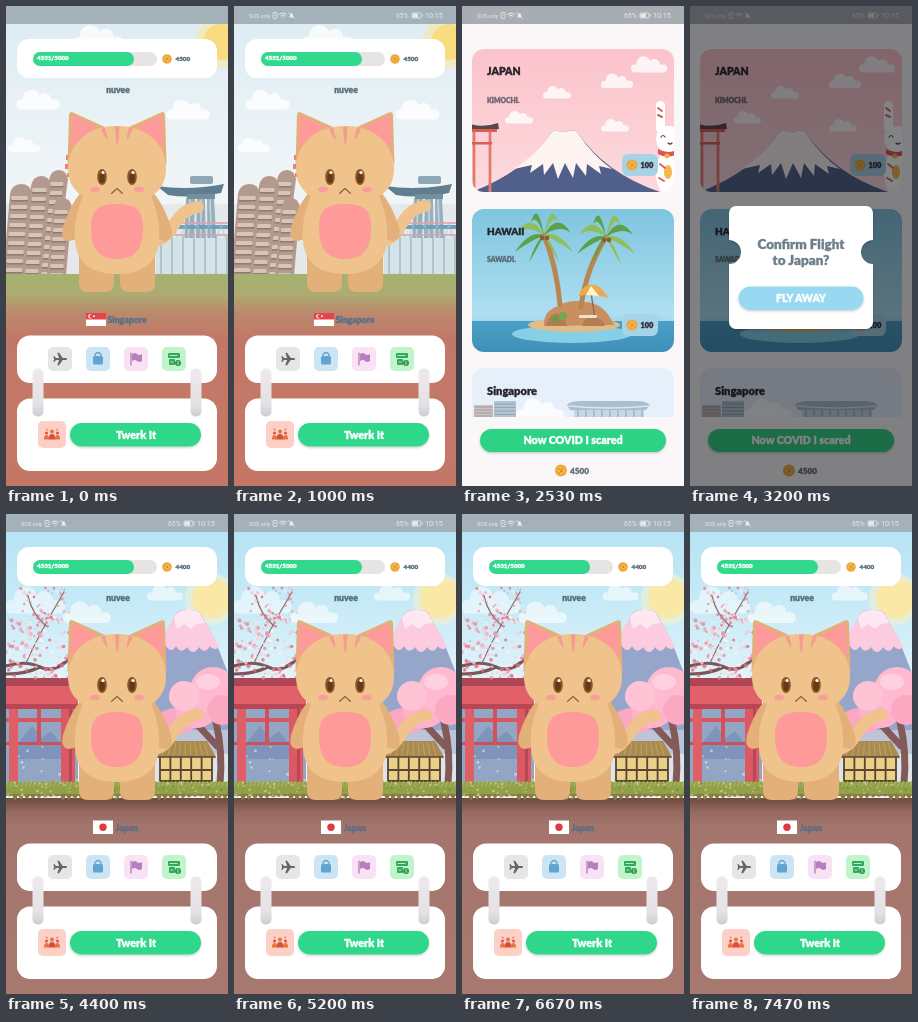
An HTML page that plays this animation: 222 by 480 pixels, repeating every 7.54 s.

```html
<!DOCTYPE html>
<html lang="en">
<head>
<meta charset="utf-8">
<title>Cat travel app</title>
<style>
html, body { margin: 0; width: 100%; height: 100%; overflow: hidden; background: #fff; }
svg { display: block; width: 222px; height: 480px; }
text { font-family: Lato, "Open Sans", sans-serif; font-weight: 900; stroke-width: .35; stroke-linejoin: round; }
.thin { font-family: Roboto, Inter, sans-serif; font-weight: 400; stroke: none; }
</style>
</head>
<body>
<svg id="stage" viewBox="0 0 222 480"></svg>
<script>
const LOOP = 7540;

// Seeded random numbers for the blossoms
let seed = 11;
const rnd = () => (seed = (seed * 16807) % 2147483647) / 2147483647;

// Shape helpers
const rect = (x, y, w, h, fill, r = 0, more = '') =>
  `<rect x="${x}" y="${y}" width="${w}" height="${h}" rx="${r}" fill="${fill}" ${more}/>`;
const oval = (x, y, rx, ry, fill, more = '') =>
  `<ellipse cx="${x}" cy="${y}" rx="${rx}" ry="${ry}" fill="${fill}" ${more}/>`;
const dot = (x, y, r, fill, more) => oval(x, y, r, r, fill, more);
const path = (d, fill, more = '') => `<path d="${d}" fill="${fill}" ${more}/>`;
const line = (d, color, w, more = '') =>
  path(d, 'none', `stroke="${color}" stroke-width="${w}" stroke-linecap="round" stroke-linejoin="round" ${more}`);
const text = (x, y, size, fill, s, anchor = 'start', more = '') =>
  `<text x="${x}" y="${y}" font-size="${size}" fill="${fill}" stroke="${fill}" text-anchor="${anchor}" ${more}>${s}</text>`;
const group = (id, body, more = '') => `<g id="${id}" ${more}>${body}</g>`;
const at = (x, y, body, s = 1) => `<g transform="translate(${x} ${y}) scale(${s})">${body}</g>`;
const range = n => [...Array(n).keys()];
const gradient = (id, ...stops) => `<linearGradient id="${id}" x2="0" y2="1">` +
  stops.map(([o, c]) => `<stop offset="${o}" stop-color="${c}"/>`).join('') + '</linearGradient>';

const cloud = (x, y, s, fill = '#fff', alpha = .8) => at(x, y,
  `<g fill="${fill}" opacity="${alpha}"><rect x="-20" y="-4" width="40" height="9" rx="4.5"/>` +
  '<circle cx="-6" cy="-5" r="8"/><circle cx="6" cy="-4" r="6"/></g>', s);
const coin = (x, y, r) => dot(x, y, r, '#eea83a') + dot(x, y, r * .62, '#f3b850') +
  line(`M${x - r * .4} ${y - r * .3}l${r * .8} ${r * .6}M${x + r * .3} ${y - r * .4}l${-r * .6} ${r * .9}`, '#d98c28', r * .17);

const defs = '<defs>' +
  gradient('sgSky', [0, '#dcebf3'], [.5, '#eef4f7'], [1, '#f7f6f4']) +
  gradient('sgFloor', [0, '#a3b26f'], [.1, '#adab72'], [.18, '#bb8a6c'], [.3, '#c27868'], [1, '#c47767']) +
  gradient('jpSky', [0, '#b4e2f4'], [.3, '#c6eaf7'], [.6, '#e6f5fa'], [1, '#eef5f6']) +
  gradient('jpFloor', [0, '#6f4a40'], [.07, '#966a60'], [.14, '#a3756c'], [1, '#a8796f']) +
  gradient('sea', [0, '#7fc5df'], [.74, '#aedff0'], [.78, '#a4d8ea'], [.78, '#4c9fc6'], [1, '#3f90b8']) +
  gradient('pink', [0, '#fbc3cb'], [1, '#fcdadd']) +
  gradient('strap', [0, '#eceaec'], [.75, '#e4e1e5'], [1, '#cfcbd1']) +
  '<clipPath id="c1"><rect x="10" y="43" width="202" height="143" rx="12"/></clipPath>' +
  '<clipPath id="c2"><rect x="10" y="203" width="202" height="143" rx="12"/></clipPath>' +
  '<clipPath id="c3"><path d="M10 411V374a12 12 0 0 1 12-12H200a12 12 0 0 1 12 12V411z"/></clipPath>' +
  '<filter id="soft" x="-20%" y="-20%" width="140%" height="150%"><feDropShadow dx="0" dy="1.2" stdDeviation="1.2" flood-opacity=".2"/></filter>' +
  '</defs>';

// Singapore backdrop
function singapore() {
  let s = rect(0, 0, 222, 310, 'url(#sgSky)');
  s += dot(215, 36, 26, '#fbe9a5', 'opacity=".6"') + dot(215, 36, 18, '#f9dc80');
  s += group('sgClouds', cloud(32, 98, 1.1) + cloud(182, 108, 1.1) + cloud(92, 36, 1.3) + cloud(18, 142, .8));
  s += rect(0, 198, 222, 74, '#e6e9ec');
  // Curved blocks with window rows
  const block = (x, y, w, lean) => {
    let b = path(`M${x} 270L${x + lean} ${y + 10}q2-10 ${w / 2}-10t${w / 2} 9L${x + w} 270z`, '#b4998e');
    for (let i = 0; i < (260 - y) / 9; i++) {
      const k = lean * (1 - (i * 9 + 12) / (270 - y));
      b += rect(x + k + 2, y + 12 + i * 9, w - 5, 4, '#d8c5ba', 2) +
        rect(x + k + 2, y + 16 + i * 9, w - 5, 1.5, '#927a73');
    }
    return b;
  };
  s += block(30, 164, 19, 13) + block(15, 170, 20, 10) + block(-3, 178, 22, 7) + block(41, 192, 19, 6);
  s += rect(60, 149, 7, 5, '#e98079') + rect(59, 158, 8, 5, '#e98079') + rect(61, 167, 6, 4, '#e98079');
  // Three towers under one deck
  s += path('M180 192h9l-2 78h-10zM191 192h8l1 78h-11zM201 192h7l4 78h-10z', '#96afbd');
  s += line('M184 194l-3 75M195 194v75M204 194l3 75', '#c4d5dd', 1.6);
  s += path('M151 180q32 5 67-2l-3 9q-30 6-53 2z', '#607e90') + rect(181, 188, 28, 5, '#748f9e') +
    rect(184, 170, 23, 8, '#8ea7b4', 2);
  s += rect(150, 219, 72, 4, '#709fbd') + line('M150 217h72M150 229h72', '#dba1ab', 1.5) +
    line('M152 228' + range(12).map(i => `l3 ${i % 2 ? 10 : -10}l3 ${i % 2 ? -10 : 10}`).join(''), '#a8bfcd', .7);
  s += rect(150, 232, 72, 38, '#d4e3e8') + line(range(7).map(i => `M${155 + i * 11} 230v38`).join(''), '#9ab0bc', 1.2);
  s += rect(0, 268, 222, 212, 'url(#sgFloor)');
  return s;
}

// Specks scattered in a box, colours taken in turn
const specks = (n, x, y, w, h, min, max, tones, alpha = .8) => range(n).map(i =>
  dot((x + rnd() * w).toFixed(1), (y + rnd() * h).toFixed(1), (min + rnd() * (max - min)).toFixed(1),
    tones[i % tones.length], `opacity="${alpha}"`)).join('');

// Japan backdrop
function japan() {
  const blossom = ['#f3a3ae', '#ee8592', '#f9c9d1', '#e56f7f', '#fff0f2'];
  let s = rect(0, 0, 222, 300, 'url(#jpSky)');
  s += dot(205, 85, 26, '#fff3c4', 'opacity=".5"') + dot(206, 84, 20, '#fae9a6');
  s += group('jpClouds', cloud(30, 92, 1.5, '#fff', .5) + cloud(82, 103, 1.2, '#fff', .6) + cloud(160, 82, .9, '#fff', .6));
  // Mountain
  s += path('M112 215L152 134L170 100q3-5 8-3 4-4 9 0 5-2 8 3l14 26L240 205V240H112z', '#96a6cb');
  s += path('M151 134L170 100q3-5 8-3 4-4 9 0 5-2 8 3l18 33q-5 5-9-1-5 9-11 1-6 10-12 0-6 8-11-1-5 8-10 0-4 6-9 2z', '#fccbe0');
  s += path('M168 104q4-8 10-7 4-4 9 0 5-2 9 6l3 6-8 1-6 5-7-5-7 5z', '#fff', 'opacity=".55"');
  s += rect(140, 216, 82, 54, '#d7d9e2', 0, 'opacity=".6"');
  // Red gate over blue water
  s += rect(0, 195, 72, 75, '#92a6c4') + path('M10 232l16-20 10 12 9-7 12 16v12H10z', '#7f94ba');
  s += specks(26, 4, 230, 62, 32, .5, 1.8, ['#dbe8f2', '#b3d8e8', '#f1b9c2'], .65);
  s += rect(0, 164, 70, 9, '#ad4654') + rect(0, 172, 72, 23, '#e2606a') + rect(0, 190, 72, 5, '#b94654') +
    rect(0, 204, 70, 4, '#d9555f') + rect(0, 228, 66, 3, '#cc505b') + rect(31, 195, 4, 36, '#cf525d') +
    rect(3, 195, 9, 75, '#df5f68') + rect(55, 195, 14, 75, '#dc5963') + rect(63, 195, 3, 75, '#b84755');
  // Blossom branches
  s += line('M0 152Q20 146 34 153T64 144M0 160q20 0 34-7', '#7c5558', 3.2) +
    line('M20 149Q34 118 58 78M40 112Q26 100 22 82', '#8f6a6a', 1.2);
  s += specks(130, -2, 104, 66, 60, .5, 2.2, blossom) + specks(60, 14, 72, 50, 38, .5, 1.8, blossom);
  // Round pink tree
  s += line('M214 270q3-32-4-62M211 232l-22-24', '#825a58', 7);
  s += oval(171, 207, 21, 13, '#fba9c2') + oval(190, 196, 21, 18, '#ffb3ca') + dot(207, 176, 23, '#ffbad0') +
    dot(178, 182, 15, '#ffc3d6') + dot(216, 196, 15, '#fba9c2') + oval(202, 168, 12, 8, '#ffd0df');
  // Hut
  s += rect(153, 242, 54, 26, '#ead18a') + path('M158 227h43l9 16h-59z', '#a98b50') +
    line(range(9).map(i => `M${160 + i * 4.8} 229l${(i - 4) * .9} 12`).join(''), '#c3a568', .9) +
    line('M151 243h58', '#5b4432', 1.6) +
    line('M154 256h52M154 267h52' + range(6).map(i => `M${154 + i * 10.4} 244v23`).join(''), '#5b4432', 1.8);
  // Grass over soil
  s += rect(0, 284, 222, 196, 'url(#jpFloor)') + rect(0, 268, 222, 14, '#93a04a');
  s += path('M0 280' + range(37).map(i => `q3 ${5 + i * 7 % 8} 6 0`).join('') + 'z', '#8a7a45');
  s += line(range(56).map(i => `M${i * 4} 272l1.500-${4 + i * 5 % 5}`).join(''), '#9db552', 1.8);
  return s + specks(150, 0, 266, 222, 17, .5, 1.5, ['#c3c873', '#768c3b', '#c08f56', '#dcd9a5'], .7);
}

function cat() {
  const skin = '#f0c28c', shade = '#e3b07a', pink = '#ff9a9b';
  const ear = path('M61.500 158L63 109q.5-4 4-2.500L99 121z', shade) + path('M64.500 142L66 112q.5-3 3-1.800L91 121z', pink);
  const eye = x => oval(x, 171, 4.800, 8, '#8d5622') + oval(x, 172, 2.800, 5, '#633a18') +
    dot(x + 1, 166.500, 1.600, '#fff');
  const side = body => body + `<g transform="translate(222 0) scale(-1 1)">${body}</g>`;
  let s = group('tail', line('M142 236C170 236 163 206 192 201', skin, 12));
  s += side(path('M75 186Q63 201 57 221q-3 13 6 14 9 0 14-12l8-28z', shade));
  s += side(path('M73 250h35v27q0 9-9 9H82q-9 0-9-9z', shade));
  s += path('M77 190H145C152 206 154 220 153 234C152 257 136 268 111 268C86 268 70 257 69 234C68 220 70 206 77 190z', skin);
  s += path('M111 198C130 198 137 204 137 222C137 244 128 253 111 253C94 253 85 244 85 222C85 204 92 198 111 198z', pink);
  s += side(ear);
  s += path('M111 120C142 120 160 139 160 163C160 187 140 198 111 198C82 198 62 187 62 163C62 139 80 120 111 120z', skin);
  s += path('M109 120.500h4.500l-1.500 17q-1 1-1.500 0zM95 123l4-1.500 2.500 11q-.5 2-1.500 0zM127 123l-4-1.500-2.500 11q.5 2 1.500 0z', '#f59a91');
  s += eye(96) + eye(126) + oval(89, 183.500, 5, 2.800, '#fc9d9c') + oval(133, 183.500, 5, 2.800, '#fc9d9c');
  return s + line('M105.500 187.500Q108 185 111 182.500Q114 185 116.500 187.500', '#8a5f3c', 1.1);
}

function icons() {
  const tiles = ['#e7e6e7', '#cce5f5', '#f8e2f4', '#c0f5cc'];
  let s = tiles.map((c, i) => rect(42 + 38 * i, 341, 24, 24, c, 5)).join('');
  s += at(54, 353, path('M7-1.200q2 1.200 0 2.400H3L-1 7h-2l2-5.800h-3.500L-6 3h-1.500l1-3-1-3H-6l1.500 1.800H-1L-3-7h2l4 5.800z', '#666'), .9);
  s += rect(87, 350, 10, 8.500, '#61a4d1', 1.5) + line('M89 350v-1.500q3-4 6 0v1.500', '#61a4d1', 1.3);
  s += line('M125 347v12', '#a874b2', 1.2) + path('M126 348q3-2 5 0t5 0v7q-3 2-5 0t-5 0z', '#b87fc0');
  s += rect(162, 347, 12, 5, '#34a85c', 1) + rect(163, 353, 6, 6, '#34a85c', 1) + dot(172, 357, 3, '#2a984f') +
    line('M164 349.500h7M165 356h2M172 355.500v3', '#c0f5cc', .9);
  return s;
}

const people = dot(46, 425.500, 2, '#e8763a') + path('M42.500 433.500q0-5.500 3.500-5.500t3.500 5.500z', '#d94e42') +
  [40.500, 51.500].map(x => dot(x, 427, 1.600, '#df5b4b') + path(`M${x - 2.600} 433.500q0-4.500 2.600-4.500t2.600 4.500z`, '#e8763a')).join('') +
  line('M40 423l1.500 1M52 423l-1.500 1', '#df5b4b', 1);

function home() {
  let s = group('sg', singapore()) + group('jp', japan());
  s += rect(0, 0, 222, 18, '#a4b1b9');
  s += rect(11, 33, 200, 39, '#fff', 12) + rect(27, 46, 124, 14, '#e7e4e4', 7) +
    rect(27, 46, 101, 14, '#30d98b', 7) + text(31, 54.200, 6.200, '#fff', '4531/5000') + coin(161, 53, 4.800) +
    text(169.500, 55.300, 6.300, '#5a6e78', '4500', 'start', 'id="money"');
  s += text(112, 86.500, 8.600, '#546d7b', 'nuvee', 'middle');
  s += cat();
  s += group('sgLabel', rect(80, 307, 20, 13, '#fff') + rect(80, 307, 20, 6.500, '#e4454c') + dot(84.500, 310.200, 2.200, '#fff') +
    dot(85.400, 310.200, 1.900, '#e4454c') + dot(88, 310.200, .9, '#fff') + text(101.500, 316.500, 8.700, '#56708a', 'Singapore'));
  s += group('jpLabel', rect(87, 306.500, 20, 13.500, '#fff') + dot(97, 313.200, 3.700, '#df3942') +
    text(109.500, 316.500, 8.800, '#5f6d80', 'Japan'));
  s += rect(11, 329.500, 200, 47.500, '#fff', 13) + rect(11, 392.500, 200, 72.500, '#fff', 13);
  s += [26.500, 184.500].map(x => rect(x, 362.500, 11, 48, 'url(#strap)', 5)).join('') + icons();
  s += rect(32, 415, 28, 27, '#fcd0c7', 5) + people;
  return s + rect(64, 417, 131, 23.500, '#2dd78a', 11.700, 'filter="url(#soft)"') + text(130, 432.600, 10.800, '#fff', 'Twerk It', 'middle');
}

const price = y => rect(160, y, 36, 22, '#a6d3e8', 6) + coin(170, y + 11, 5.600) + text(178.500, y + 13.700, 7.400, '#2c2c30', '100');

function palm(x, y, lean) {
  let s = line(`M${x} ${y}q${lean * .2}-38 ${lean}-70`, '#b98550', 5);
  const cx = x + lean, cy = y - 70;
  [[-29, 17], [-27, -2], [-15, 27], [15, 27], [27, -2], [29, 17], [-13, -13], [14, -13]].forEach(([dx, dy], i) => {
    s += path(`M${cx} ${cy}q${dx * .5} ${dy - 22} ${dx} ${dy}q${-dx * .4}-9 ${-dx} ${-dy}z`, i % 2 ? '#8dbf5c' : '#5da04a');
  });
  return s + dot(cx - 2, cy + 3, 2.400, '#8c5c33') + dot(cx + 3, cy + 3, 2.400, '#8c5c33');
}

function list() {
  let s = rect(0, -40, 222, 570, '#faf7f9');
  // Japan card
  s += `<g clip-path="url(#c1)">` + rect(10, 43, 202, 143, 'url(#pink)') +
    cloud(95, 89, .7) + cloud(155, 78, .8) + cloud(187, 62, .9) + cloud(57, 114, .7) + cloud(153, 122, .7) +
    path('M10 186Q64 165 89 127q3-3 7-2 5 2 10 0 6-2 10 2 27 40 82 59z', '#50608a') +
    path('M52 163Q75 148 89 127q3-3 7-2 5 2 10 0 6-2 10 2 14 22 34 36l-13-3 2 8-14-10-1 12-10-13-3 15-8-15-7 16-5-16-9 12-1-11-13 9 2-8z', '#fdf4f2') +
    line('M12 126v60M28 126v60', '#e17a70', 2.800) + path('M8 118q13 4 28-1l1 6H8z', '#59464f') + rect(8, 123, 27, 3, '#d95f52') + rect(9, 136, 21, 2.500, '#d95f52') +
    oval(207, 167, 13, 23, '#fff') + dot(207, 133, 13, '#fff') + path('M196 127l1-12 9 7z', '#fff') + rect(194, 95, 9, 32, '#fff', 4.500) +
    line('M199 131q2-3 4 0M206 137q2 2 4 0', '#5d4650', 1.200) + path('M196 143q10 6 20 0v5q-10 5-20 0z', '#e0524f') +
    dot(205, 150, 2.500, '#efb542') + oval(206, 166, 4, 7, '#f3b94c') +
    line('M196 102l4 3M196 109l4 2M198 158l5 4M197 172l5 3', '#d9605c', 2) + '</g>';
  s += text(25, 69, 10.500, '#252529', 'JAPAN') + text(25, 97, 6.800, '#6d6570', 'KIMOCHI.') + price(148);
  // Hawaii card
  s += `<g clip-path="url(#c2)">` + rect(10, 203, 202, 143, 'url(#sea)') +
    oval(110, 328, 60, 9, '#86cfe6') + oval(112, 319, 46, 7, '#e0bd88') +
    path('M82 320q-1-15 14-20 12-7 26-4 20 0 30 23z', '#c98f60') +
    path('M84 320q2-11 11-13 8 3 10 13zM120 320q2-9 11-10 9 2 12 10z', '#b57b52') +
    palm(98, 299, -16) + palm(119, 301, 25) +
    line('M133 312l-4-25', '#8d684c', 1.400) + path('M116 290q7-17 22-9l9 11q-16-5-31-2z', '#eda94d') + path('M124 289l5-9 8 10z', '#fff3d2') +
    rect(117, 309, 18, 3, '#f0e2d0', 1) + dot(101, 310, 4, '#75a950') + dot(93, 313, 3.500, '#6a9c48') + '</g>';
  s += text(25, 229, 9.900, '#252529', 'HAWAII') + text(25, 256, 6.800, '#5a6b76', 'SAWADI.') + price(308);
  // Singapore card, cut by the bottom bar
  s += `<g clip-path="url(#c3)">` + rect(10, 362, 202, 60, '#e6f0fb') + cloud(78, 408, 1.200, '#fff') +
    path('M105 399q3-4 14-4h54q12 0 15 4l-4 5q-38 4-76 0z', '#a9bfd1') + line('M107 400q40 4 80 0', '#dbe7ef', 1.600) + rect(112, 404, 70, 8, '#c6d6e3') +
    line(range(9).map(i => `M${116 + i * 8} 404v8`).join(''), '#93afc5', 1.200) +
    rect(12, 399, 19, 13, '#d2bfb8') + rect(32, 395, 22, 17, '#b3c4d0') +
    line(range(4).map(i => `M13 ${401 + i * 3}h17M33 ${398 + i * 3.500}h20`).join(''), '#8fa2b2', 1) + '</g>';
  s += text(25, 388.500, 11.100, '#252529', 'Singapore');
  s += rect(18, 423, 186, 23, '#2dd284', 11.500, 'filter="url(#soft)"') + text(111, 438.300, 10.700, '#fff', 'Now COVID I scared', 'middle');
  return s + coin(99, 464.500, 6) + text(108, 467.500, 8.200, '#636f77', '4500');
}

function dialog() {
  return path('M46 200H176a7 7 0 0 1 7 7V234A12 12 0 0 0 183 258V316a7 7 0 0 1-7 7H46a7 7 0 0 1-7-7V258A12 12 0 0 0 39 234V207a7 7 0 0 1 7-7z', '#fff', 'filter="url(#soft)"') +
    text(111, 243, 13.500, '#6c7f89', 'Confirm Flight', 'middle') + text(111, 258.500, 13.500, '#6c7f89', 'to Japan?', 'middle') +
    rect(48.500, 280.500, 125, 23.500, '#98d9f1', 11.700, 'filter="url(#soft)"') +
    group('ripple', oval(138.500, 296.500, 27, 8.500, '#fff')) + text(111, 296, 10.400, '#fff', 'FLY AWAY', 'middle');
}

const status = text(15, 11.500, 5.400, '#fff', 'SOS only', 'start', 'class="thin"') +
  rect(39, 6.500, 4, 6, 'none', .8, 'stroke="#fff" stroke-width=".8"') + line('M41 8v2', '#fff', .7) +
  line('M45.500 8.500q3.500-3 7 0M47 10q2-2 4 0M49 11.800v.1', '#fff', 1) +
  path('M55 11.500q1-1 1-3 1.500-3 3 0 0 2 1 3z', '#fff') + line('M54.500 6.500l6 6', '#fff', .8) +
  text(162, 12, 6.800, '#fff', '65%', 'start', 'class="thin"') +
  rect(178, 7, 9, 5, 'none', 1, 'stroke="#fff" stroke-width=".8"') + rect(178.500, 7.500, 5.500, 4, '#fff') + rect(187.700, 8.500, 1, 2, '#fff') +
  text(191, 12, 7.200, '#fff', '10:15', 'start', 'class="thin"');

document.getElementById('stage').innerHTML = defs + group('home', home()) +
  group('listBox', group('list', list()) + rect(0, 0, 222, 18, '#a7adb1')) + group('status', status, 'opacity=".75"') +
  rect(0, 0, 222, 480, '#08080c', 0, 'id="dim"') + group('dialog', dialog());

const $ = id => document.getElementById(id);
const set = (id, name, v) => $(id).setAttribute(name, v);
const show = (id, on) => set(id, 'visibility', on ? 'visible' : 'hidden');
const clamp = k => Math.max(0, Math.min(1, k));
const part = (t, a, b) => clamp((t - a) / (b - a));
const easeOut = k => 1 - (1 - k) ** 3;

function draw(t) {
  const inJapan = t >= 4000;
  ['sg', 'sgLabel'].forEach(id => show(id, !inJapan));
  ['jp', 'jpLabel'].forEach(id => show(id, inJapan));
  show('status', t >= 70);
  $('money').textContent = inJapan ? '4400' : '4500';

  const wave = Math.sin(t / LOOP * Math.PI * 10);
  set('tail', 'transform', `rotate(${(wave * 1.500).toFixed(2)} 145 233)`);
  const drift = Math.sin(t / LOOP * Math.PI * 2) * 2;
  set('sgClouds', 'transform', `translate(${drift} 0)`);
  set('jpClouds', 'transform', `translate(${drift} 0)`);

  // List slides up while fading in, then fades back out
  const open = part(t, 1300, 1650), close = part(t, 4050, 4440);
  set('listBox', 'opacity', open * (1 - easeOut(close)));
  show('listBox', open > 0 && close < 1);
  set('list', 'transform', `translate(0 ${38 * (1 - easeOut(part(t, 1270, 1820))) + 20 * close * close})`);

  const pop = easeOut(part(t, 2840, 3190)) * (1 - part(t, 4000, 4200));
  const scale = t < 4000 ? .9 + .1 * pop : 1;
  set('dim', 'opacity', .5 * pop);
  set('dialog', 'opacity', pop);
  set('dialog', 'transform', `translate(111 261) scale(${scale}) translate(-111 -261)`);
  show('dialog', pop > 0);

  const press = part(t, 3500, 3750);
  set('ripple', 'opacity', Math.sin(press * Math.PI) * .3);
  set('ripple', 'transform', `translate(138.5 296.5) scale(${.3 + .7 * press}) translate(-138.5 -296.5)`);
}

const start = performance.now();
function tick() {
  draw((performance.now() - start) % LOOP);
  requestAnimationFrame(tick);
}
draw(0);
requestAnimationFrame(tick);
</script>
</body>
</html>
```
